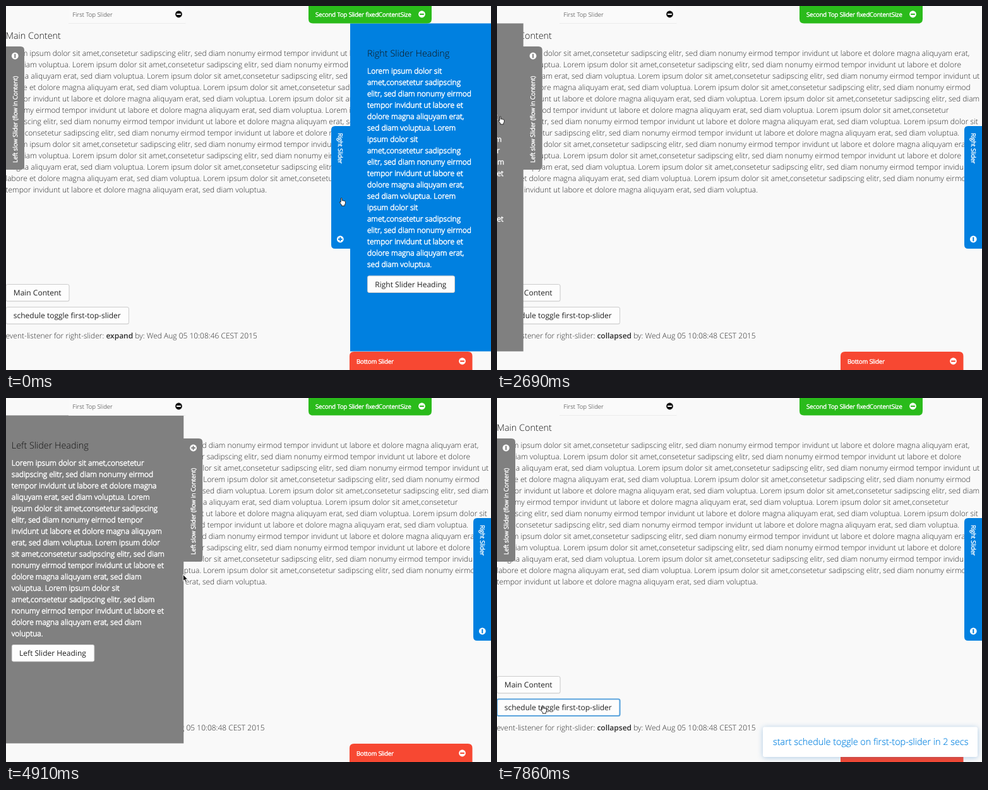
Recreate the animation shown at these times as an HTML page. Size 768 px wide and 576 px high, loop 8 s.

```html
<!DOCTYPE html>
<html lang="en">
<head>
<meta charset="utf-8">
<title>Sliders</title>
<style>
  html, body { margin: 0; width: 100%; height: 100%; overflow: hidden; background: #f9f9f9; }
  svg { display: block; width: 768px; height: 576px; }
  text { font: 300 12px "Open Sans", sans-serif; fill: #2b2b2b; white-space: pre; text-rendering: geometricPrecision; }
  .head { font-size: 14.4px; fill: #111; }
  .btn { font-weight: 400; fill: #222; }
  .tab { font-size: 9.6px; }
  .white { fill: #fff; stroke: #fff; stroke-width: .55px; }
  .strong { font-weight: 600; }
  .toast { font-size: 14.4px; fill: #0080e0; stroke: #0080e0; stroke-width: .15px; }
</style>
</head>
<body>
<svg id="stage" viewBox="0 0 768 576"></svg>
<script>
const LOOP = 8000;
const BLUE = '#0080e0', GREY = '#808080', GREEN = '#2abb1b', RED = '#f74832';
const words = ('Lorem ipsum dolor sit amet,consetetur sadipscing elitr, sed diam nonumy eirmod tempor ' +
  'invidunt ut labore et dolore magna aliquyam erat, sed diam voluptua.').split(' ');

const text = (x, y, str, cls = '', extra = '') => `<text x="${x}" y="${y}" class="${cls}" ${extra}>${str}</text>`;
const rect = (x, y, w, h, fill, extra = '') =>
  `<rect x="${x}" y="${y}" width="${w}" height="${h}" fill="${fill}" ${extra}/>`;

// Endless lorem ipsum, broken after the given number of words per line.
function lorem(x, y, counts, cls) {
  let n = 0;
  return counts.map((count, i) => {
    const line = Array.from({ length: count }, () => words[n++ % words.length]).join(' ');
    return text(x, y + 18 * i, line, cls);
  }).join('');
}

function button(x, y, w, label, id = '') {
  return rect(x, y + 1, w, 27, 'rgba(0,0,0,.07)', 'rx="2.5"') +
    rect(x + .5, y + .5, w - 1, 26.5, '#fdfdfd', `rx="2.5" stroke="#ccc" id="${id}"`) +
    text(x + 12.3, y + 18, label, 'btn');
}

function icon(x, y, fill, bar, id = '', turn = 0) {
  return `<g transform="translate(${x} ${y}) rotate(${turn})"><circle r="5.4" fill="${fill}"/>` +
    rect(-3.3, -1, 6.6, 2, bar) + rect(-1, -3.3, 2, 6.6, bar, `id="${id}" visibility="hidden"`) + '</g>';
}

const page =
  text(-.5, 52, 'Main Content', 'head') +
  lorem(-.5, 79.3, [20, 20, 20, 20, 21, 19, 22, 19, 20, 20, 20, 20, 12], '') +
  button(-.5, 440, 101, 'Main Content', 'mainBtn') +
  button(-.5, 476, 195.5, 'schedule toggle first-top-slider', 'planBtn') +
  text(-.5, 526.3, 'event-listener for right-slider: <tspan class="strong" id="state"></tspan>' +
    ' by: Wed Aug 05 10:08:<tspan id="sec"></tspan> CEST 2015');

// Both side panels are drawn relative to their inner edge at x = 0.
const left = '<g id="left">' +
  rect(-300, 27.5, 300, 519, GREY) +
  `<path d="M-1 64H24q6 0 6 6V253q0 6-6 6H-1z" fill="${GREY}"/>` +
  icon(15.3, 79, '#fff', GREY, 'leftPlus', 90) +
  text(0, 0, 'Left slow Slider (flow in Content)', 'tab white', 'transform="translate(18.7 248) rotate(-90)"') +
  text(-272.5, 80, 'Left Slider Heading', 'head') +
  lorem(-272.5, 107.3, [5, 6, 7, 6, 5, 6, 7, 7, 6, 7, 6, 5, 5, 7, 6, 1], 'white') +
  button(-272.5, 390, 131.5, 'Left Slider Heading') + '</g>';

const right = '<g id="right">' +
  rect(0, 27.5, 260, 519, BLUE) +
  `<path d="M1 190H-24q-6 0-6 6V378q0 6 6 6H1z" fill="${BLUE}"/>` +
  text(0, 0, 'Right Slider', 'tab white', 'transform="translate(-19.2 201) rotate(90)"') +
  icon(-15.7, 369, '#fff', BLUE, 'rightPlus', 90) +
  text(27, 80, 'Right Slider Heading', 'head') +
  lorem(27, 107.3, [4, 2, 5, 5, 4, 4, 3, 2, 5, 5, 4, 4, 3, 2, 5, 5, 4, 3], 'white') +
  button(27, 426.5, 139, 'Right Slider Heading') + '</g>';

const bars =
  rect(99, 0, 185.5, 27.5, '#fafafa') + rect(99, 27, 185.5, 1, '#ececec') +
  text(105.5, 16.5, 'First Top Slider', 'tab') + icon(273.5, 13, '#111', '#fff') +
  `<path d="M479 0H674V20.500q0 7-7 7H486q-7 0-7-7z" fill="${GREEN}"/>` +
  text(490, 16.5, 'Second Top Slider fixedContentSize', 'tab white') + icon(658.5, 13, '#fff', GREEN) +
  `<path d="M544 576V554q0-7 7-7H731.500q7 0 7 7V576z" fill="${RED}"/>` +
  text(555, 565.5, 'Bottom Slider', 'tab white') + icon(722.5, 562, '#fff', RED);

const toast = '<g id="toast">' +
  rect(421, 520.5, 340, 47.5, '#fff', 'rx="3" style="filter:drop-shadow(0 1px 4px rgba(0,100,190,.3))"') +
  text(437, 549, 'start schedule toggle on first-top-slider in 2 secs', 'toast') + '</g>';

const cursor = '<g id="cursor">' +
  '<path id="arrow" d="M-1-6V4.500L1.300 2.400 3 6.200 4.800 5.400 3.100 1.800H6.200z" fill="#111" stroke="#fff" stroke-width=".8"/>' +
  '<path id="hand" d="M-2.500-6q1.300-.8 1.700.6V-2q1-.6 1.700.2 1-.5 1.600.4 1.700-.4 1.900 1V2.500L3.300 4.500V6.200H-1.700V4.700' +
  'L-4.800.7q0-1.500 1.900-.2z" fill="#fff" stroke="#111" stroke-width=".9" stroke-linejoin="round"/></g>';

document.getElementById('stage').innerHTML = rect(0, 0, 768, 576, '#f9f9f9') + page + left + right + bars + toast + cursor;

const el = {};
document.querySelectorAll('[id]').forEach(node => { if (node.id) el[node.id] = node; });

const clamp = v => Math.min(1, Math.max(0, v));
const swing = (t, start, span) => .5 - Math.cos(Math.PI * clamp((t - start) / span)) / 2;
const between = (t, a, b) => t >= a && t < b;
const show = (node, on) => node.setAttribute('visibility', on ? 'visible' : 'hidden');
const move = (node, x, y = 0) => node.setAttribute('transform', `translate(${x.toFixed(2)} ${y.toFixed(2)})`);

// time, x, y
const path = [
  [130, 533, 310], [290, 490, 229], [1200, 490, 229], [1490, 6, 184], [1780, 6, 184], [1940, 7, 181],
  [2900, 7, 181], [3580, 238, 197], [4000, 318, 225], [4350, 316, 252], [4910, 281, 285],
  [5350, 468, 375], [5800, 388, 425], [6450, 69, 459], [6900, 69, 459], [7250, 74, 493]
];

function pointer(t) {
  const i = path.findIndex(k => k[0] > t);
  if (i === 0) return path[0].slice(1);
  if (i < 0) return path[path.length - 1].slice(1);
  const [t0, x0, y0] = path[i - 1], [t1, x1, y1] = path[i];
  const p = (t - t0) / (t1 - t0);
  return [x0 + (x1 - x0) * p, y0 + (y1 - y0) * p];
}

function draw(t) {
  move(el.right, 545 + 225 * swing(t, 667, 600));
  move(el.left, -1 + 282.5 * (swing(t, 2213, 1880) - swing(t, 4880, 1800)));
  show(el.rightPlus, t < 1267);
  show(el.leftPlus, between(t, 4093, 6680));
  el.state.textContent = t < 1267 ? 'expand' : 'collapsed';
  el.sec.textContent = t < 1267 ? '46' : '48';

  el.mainBtn.setAttribute('fill', between(t, 6350, 7050) ? '#ececec' : '#fdfdfd');
  el.planBtn.setAttribute('fill', between(t, 7100, 7400) ? '#ececec' : '#fdfdfd');
  el.planBtn.setAttribute('stroke', t >= 7400 ? '#5ba4dd' : '#ccc');
  el.planBtn.setAttribute('stroke-width', t >= 7400 ? 2.2 : 1);
  el.toast.setAttribute('opacity', clamp((t - 7420) / 330));

  move(el.cursor, ...pointer(t));
  const hand = t < 190 || between(t, 1850, 3000) || t >= 6300;
  show(el.hand, hand);
  show(el.arrow, !hand);
}

const begin = performance.now();
function tick() {
  draw((performance.now() - begin) % LOOP);
  requestAnimationFrame(tick);
}
tick();
</script>
</body>
</html>
```
